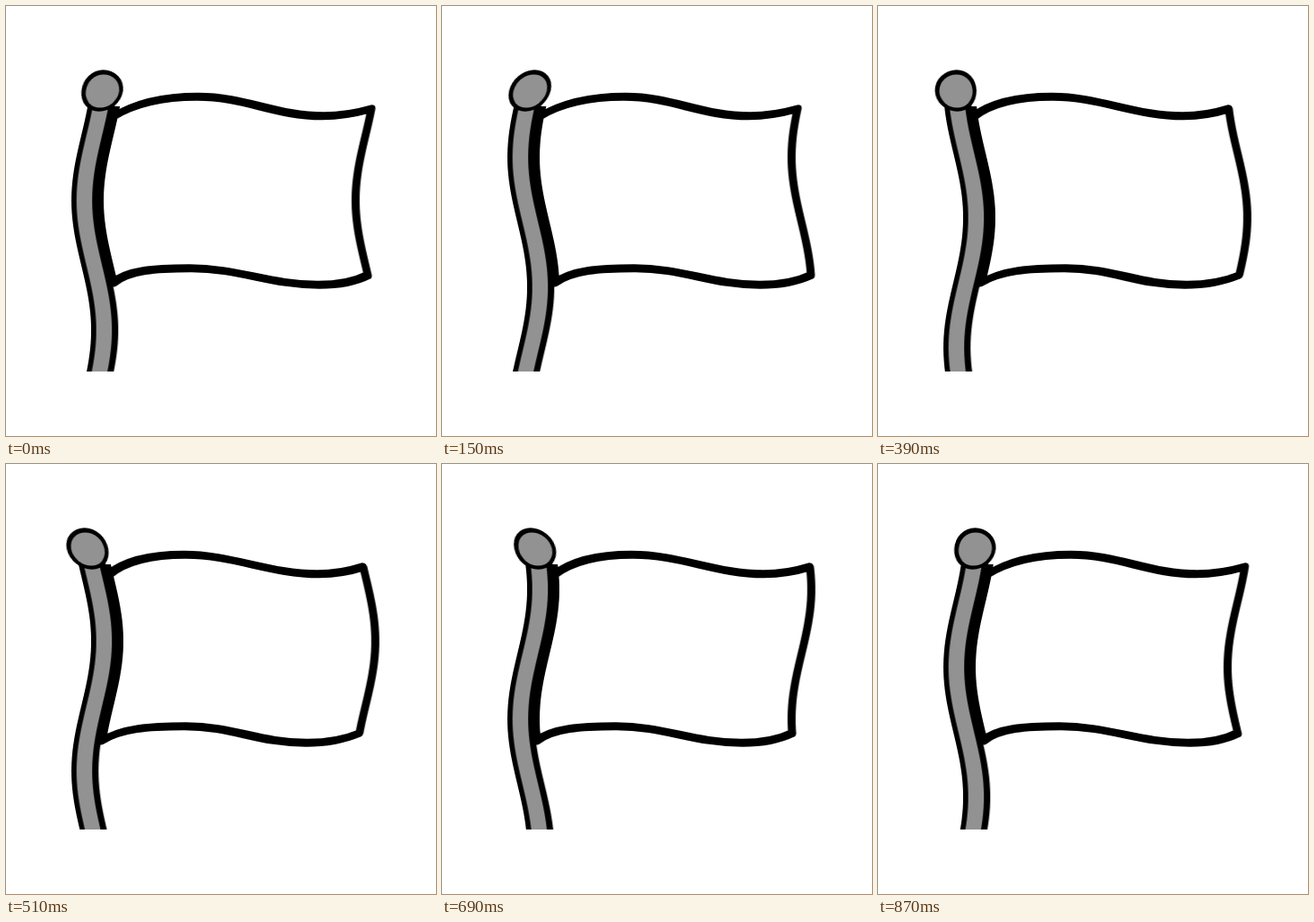
Animation, 480 px wide and 480 px high, one loop 0.9 s. Source, as an HTML page with a canvas:

```html
<!DOCTYPE html>
<html lang="en">
<head>
<meta charset="utf-8">
<title>Waving flag</title>
<style>
  html, body { margin: 0; width: 100%; height: 100%; overflow: hidden; background: #fff; }
  canvas { display: block; width: 480px; height: 480px; }
</style>
</head>
<body>
<canvas id="stage" width="480" height="480"></canvas>
<script>
const SIZE = 480, LOOP = 900, STEP = 30;
const TOP = 68, BOTTOM = 408;
const AMP = 11, WAVELENGTH = 290, CREST = 217;
const GREY = '#929292';

// Straight, unwaved artwork; each row is shifted sideways later.
function drawFlag() {
  const art = document.createElement('canvas');
  art.width = art.height = SIZE;
  const c = art.getContext('2d');

  const box = (color, x0, y0, x1, y1) => {
    c.fillStyle = color;
    c.fillRect(x0, y0, x1 - x0, y1 - y0);
  };
  const disc = (color, x, y, r) => {
    c.fillStyle = color;
    c.beginPath();
    c.arc(x, y, r, 0, Math.PI * 2);
    c.fill();
  };
  const edge = (start, peak, dipX, dip, end) => {
    c.moveTo(115, start);
    c.bezierCurveTo(135, start - 14, 165, peak, 205, peak);
    c.bezierCurveTo(258, peak, dipX - 53, dip, dipX, dip);
    c.bezierCurveTo(dipX + 20, dip, 383, dip - 2.5, 401.2, end);
  };

  c.lineWidth = 9;
  c.lineJoin = c.lineCap = 'round';
  c.beginPath();
  edge(123.5, 101.3, 349, 122.8, 114.8);
  c.lineTo(401.2, 300.5);
  edge(309, 292.7, 344, 311.3, 300.5);
  c.stroke();

  box('#000', 106, 112, 120, 309);
  box('#000', 84, 100, 114.3, BOTTOM);
  box(GREY, 89.7, 100, 107.2, BOTTOM);
  disc('#000', 97.7, 94.5, 23.2);
  disc(GREY, 98, 95, 18.6);
  return art;
}

const ctx = document.getElementById('stage').getContext('2d');
const art = drawFlag();

function render(now) {
  const t = Math.floor((now % LOOP) / STEP) * STEP;
  ctx.clearRect(0, 0, SIZE, SIZE);
  for (let y = TOP; y < BOTTOM; y++) {
    const phase = 2 * Math.PI * ((y + 0.5 - CREST) / WAVELENGTH + t / LOOP);
    ctx.drawImage(art, 0, y, SIZE, 1, -AMP * Math.cos(phase), y, SIZE, 1);
  }
}

let begin;
function tick(now) {
  begin ??= now;
  render(Math.max(0, now - begin));
  requestAnimationFrame(tick);
}
render(0);
requestAnimationFrame(tick);
</script>
</body>
</html>
```
